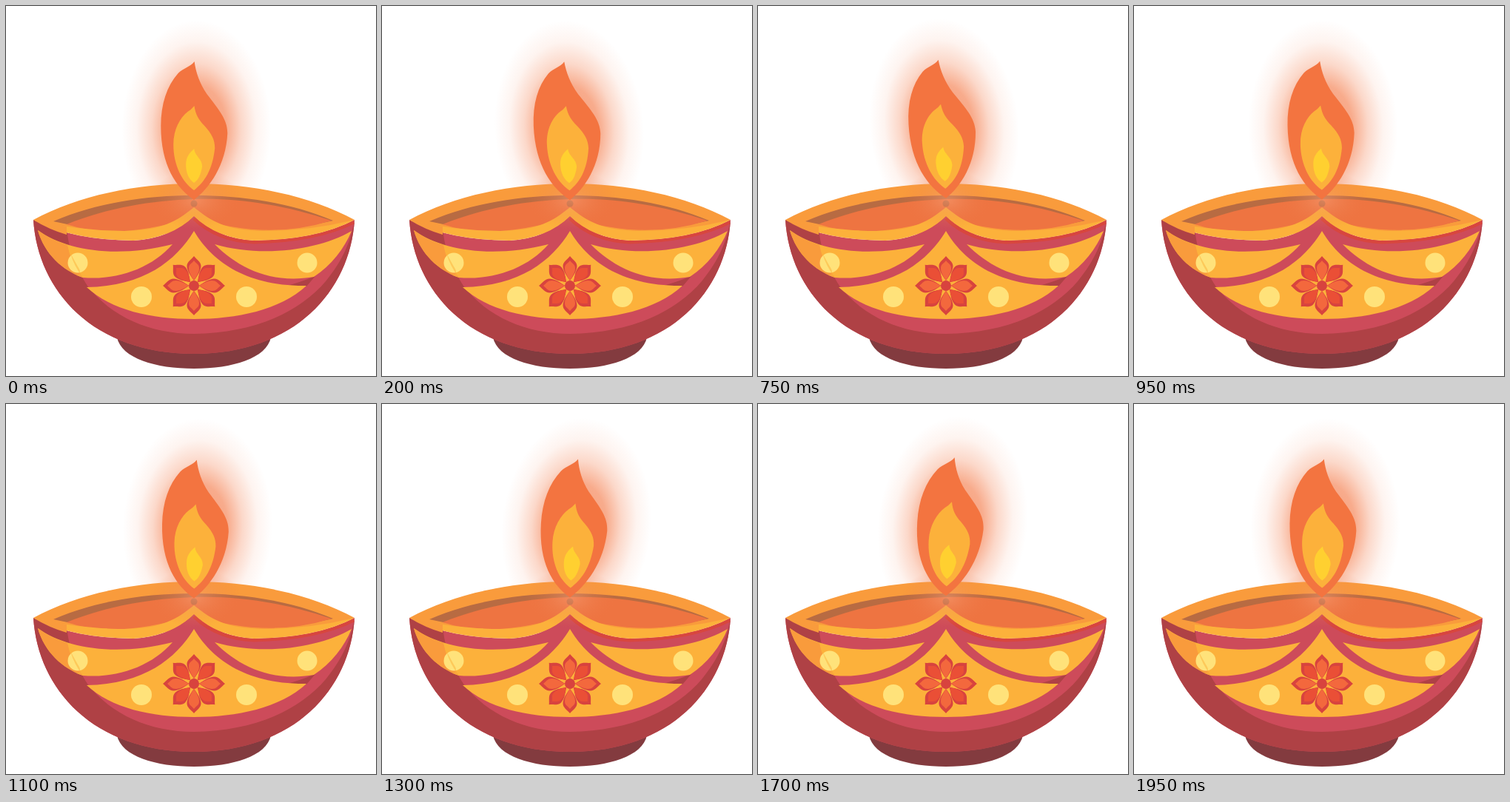
An HTML page that plays this animation: 500x500 px, repeating every 2 s.

```html
<!DOCTYPE html>
<html lang="en">
<head>
<meta charset="utf-8">
<title>Diya</title>
<style>
  html, body { margin: 0; width: 100%; height: 100%; overflow: hidden; background: #fff; }
  svg { display: block; width: 100%; height: 100%; }
</style>
</head>
<body>
<svg viewBox="0 0 500 500">
  <defs>
    <radialGradient id="glowFill">
      <stop offset="0" stop-color="#f37440" stop-opacity=".72"/>
      <stop offset=".4" stop-color="#f37440" stop-opacity=".6"/>
      <stop offset=".6" stop-color="#f37440" stop-opacity=".28"/>
      <stop offset=".8" stop-color="#f37440" stop-opacity=".08"/>
      <stop offset="1" stop-color="#f37440" stop-opacity="0"/>
    </radialGradient>
    <radialGradient id="hazeFill">
      <stop offset="0" stop-color="#f7a37c" stop-opacity=".5"/>
      <stop offset=".5" stop-color="#f08a5c" stop-opacity=".25"/>
      <stop offset="1" stop-color="#ee7441" stop-opacity="0"/>
    </radialGradient>
    <clipPath id="bowlClip">
      <path id="bowlShape" d="M37 289C43 385 118 470 254 470S465 385 471 289Q420 316 335 317Q285 314 254 284Q223 314 172 317Q88 316 37 289Z"/>
    </clipPath>
  </defs>

  <g class="sway"><ellipse cx="257" cy="166" rx="101" ry="147" fill="url(#glowFill)"/></g>

  <!-- foot -->
  <path fill="#833b3f" d="M150 448C156 476 202 490 254 490S352 476 358 448Z"/>

  <!-- back rim, inner wall and oil -->
  <path fill="#f99b3c" d="M37 289C98 256 176 240 254 240S410 256 471 289Q360 330 254 300Q140 330 37 289Z"/>
  <path fill="#b86b42" d="M64 291C122 266 188 256 254 256S386 266 442 290Q350 312 254 285Q150 312 64 291Z"/>
  <path fill="#ee7441" d="M82 295C140 272 196 263 254 261S374 268 440 290Q350 318 254 285Q150 318 82 295Z"/>
  <circle cx="254" cy="267" r="4.5" fill="#b8663f"/>

  <!-- body -->
  <use href="#bowlShape" fill="#cd4b5a"/>
  <g clip-path="url(#bowlClip)">
    <path fill="#af4145" d="M30 280H82C80 320 92 350 110 378C142 420 195 443 254 443C338 442 398 412 432 372C455 344 466 318 471 289L490 500H20Z"/>
    <path fill="none" stroke="#d8463e" stroke-width="5" d="M254 287Q285 317 335 319Q420 317 470 292"/>
    <path fill="#af4145" d="M376 379Q396 374 418 365L406 379Z"/>
    <g fill="#fcb13b">
      <path d="M43 303C82 331 150 341 225 322C197 354 151 371 104 367C76 357 52 335 43 303Z"/>
      <path d="M282 322C348 341 424 329 467 304C457 328 440 350 416 366C358 376 314 354 282 322Z"/>
      <path d="M254 304C277 343 322 379 406 378C370 411 312 423 254 423S142 411 109 380C186 379 230 344 254 304Z"/>
    </g>
    <path fill="#f99b3c" d="M43 303Q60 316 83 323Q87 346 104 367C76 357 52 335 43 303Z"/>
    <g fill="#ffe27a">
      <circle cx="97" cy="347" r="13.5"/><circle cx="407" cy="347" r="13.5"/>
      <circle cx="183" cy="393" r="14"/><circle cx="325" cy="393" r="14"/>
    </g>
    <path fill="#fcb13b" d="M87 334Q92 352 104 367L95 364Q104 362 97 352Z" opacity=".5"/>
  </g>

  <!-- front rim -->
  <path fill="#fcb13b" d="M37 289Q98 304 160 304C212 303 230 291 254 272C278 291 296 303 348 304Q410 304 471 289Q420 316 335 317Q285 314 254 284Q223 314 172 317Q88 316 37 289Z"/>
  <path fill="#f99b3c" d="M37 289L82 298V309Q58 302 37 289Z"/>

  <g id="flower" transform="translate(254 378)"></g>

  <ellipse cx="256" cy="262" rx="62" ry="40" fill="url(#hazeFill)"/>

  <g class="sway">
    <path fill="#f37440" d="M254 75C256 90 261 104 271 119C287 140 299 153 299 172C297 215 275 246 254 262C230 246 209 215 209 162C209 132 217 108 232 91C239 84 249 82 254 75Z"/>
    <path fill="#fcb13b" d="M254 135C256 147 260 154 268 162C278 173 282 181 282 192C279 222 268 238 254 249C238 238 226 215 226 187C226 166 235 151 245 143Q250 140 254 135Z"/>
    <path fill="#ffd030" d="M254 193C255 203 265 206 265 217C263 228 260 235 254 239C247 234 243 226 243 214C243 204 248 198 254 193Z"/>
  </g>
</svg>
<script>
  const LOOP = 2000, STEP = 50, BASE_Y = 262, FLAME_HEIGHT = 187;
  const swaying = document.querySelectorAll('.sway');

  const petal = (angle, from, to, width, fill) => {
    const mid = from + (to - from) * .6;
    return `<path transform="rotate(${angle})" fill="${fill}" d="M0 ${-from}
      C${-width * .4} ${-from - 5} ${-width} ${-mid + 6} ${-width} ${-mid}
      C${-width} ${-mid - 6} -4 ${-to + 5} 0 ${-to}
      C4 ${-to + 5} ${width} ${-mid - 6} ${width} ${-mid}
      C${width} ${-mid + 6} ${width * .4} ${-from - 5} 0 ${-from}Z"/>`;
  };

  function drawFlower() {
    let parts = '';
    for (const offset of [45, 0]) {
      for (let i = 0; i < 4; i++) {
        const angle = offset + i * 90;
        const length = angle % 180 === 90 ? 42 : 40;
        parts += petal(angle, 6, length, 9.5, '#d8433e');
        parts += petal(angle, 7, length - 6, 7, offset ? '#ea4f36' : '#f3683d');
      }
    }
    for (let i = 0; i < 8; i++) {
      parts += `<path transform="rotate(${i * 45 + 22.5})" fill="#fcb13b" d="M-2.5 -6L0 -19L2.5 -6Z"/>`;
    }
    document.getElementById('flower').innerHTML = parts + '<circle r="7" fill="#d8433e"/>';
  }

  function render(time) {
    const t = Math.floor((time % LOOP) / STEP) * STEP;
    const phase = t / LOOP * 2 * Math.PI;
    const dx = .6 * Math.cos(phase) - 14 * Math.sin(phase);
    const dy = 1.7 * Math.cos(2 * phase - .75) - 1.2;
    const skew = dx / FLAME_HEIGHT;
    const matrix = `matrix(1 0 ${-skew} 1 ${skew * BASE_Y} ${dy})`;
    swaying.forEach(part => part.setAttribute('transform', matrix));
  }

  const start = performance.now();
  function tick() {
    render(performance.now() - start);
    requestAnimationFrame(tick);
  }

  drawFlower();
  render(0);
  requestAnimationFrame(tick);
</script>
</body>
</html>
```
